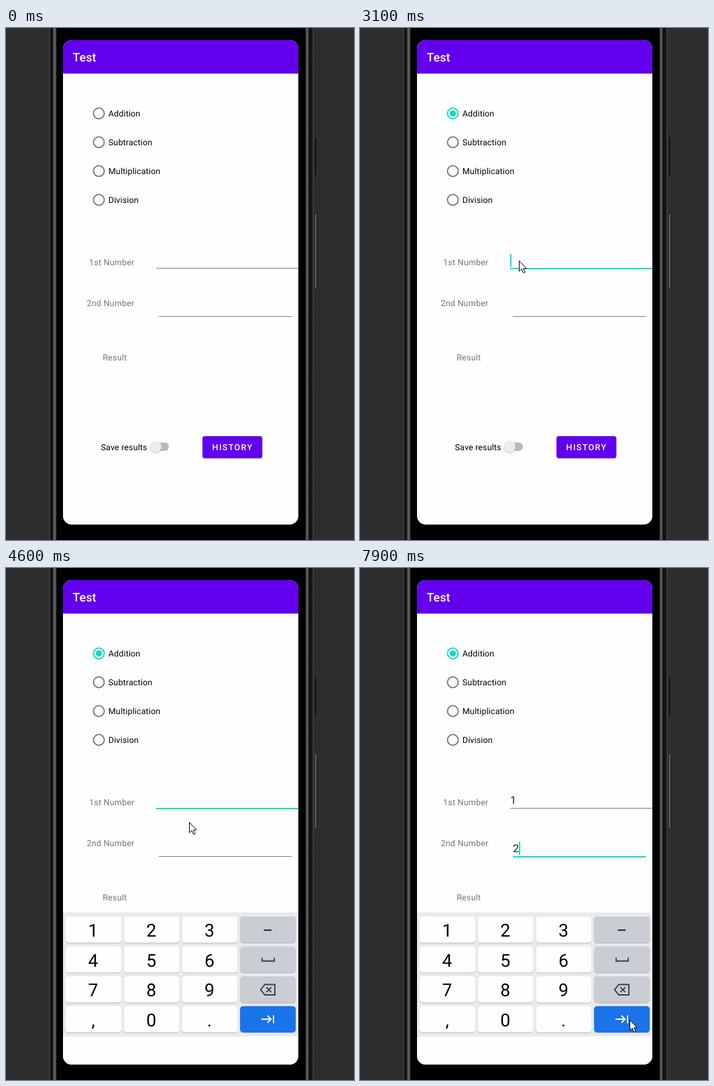
Write an HTML page that moves like this. It is 519 by 764 pixels and loops after 8 s.

```html
<!DOCTYPE html>
<html lang="en">
<head>
<meta charset="utf-8">
<title>Calculator demo</title>
<style>
html, body { margin: 0; width: 100%; height: 100%; overflow: hidden; background: #2d2d2f; }
svg { display: block; }
text { font-family: Roboto, sans-serif; font-size: 12.5px; text-rendering: geometricPrecision; }
.label { fill: #757575; letter-spacing: .22px; }
.option { fill: #000; letter-spacing: .14px; }
.value { font-size: 16.07px; fill: #212121; }
.key { font-size: 26.5px; fill: #000; text-anchor: middle; }
.icon { fill: none; stroke: #3c4043; stroke-width: 1.9; }
</style>
</head>
<body>
<svg width="519" height="764" viewBox="0 0 519 764">
  <defs>
    <clipPath id="screen"><rect x="85" y="18" width="351" height="723" rx="13"/></clipPath>
    <linearGradient id="leftEdge">
      <stop offset="0" stop-color="#1c1c1d"/><stop offset=".1" stop-color="#49494a"/>
      <stop offset=".22" stop-color="#1a1a1b"/><stop offset=".5" stop-color="#101011"/>
      <stop offset=".6" stop-color="#4b4b4d"/><stop offset=".78" stop-color="#6a6a6c"/>
      <stop offset="1" stop-color="#000"/>
    </linearGradient>
    <linearGradient id="rightEdge">
      <stop offset="0" stop-color="#000"/><stop offset=".2" stop-color="#6a6a6c"/>
      <stop offset=".36" stop-color="#3a3a3b"/><stop offset=".46" stop-color="#0c0c0d"/>
      <stop offset=".75" stop-color="#1a1a1b"/><stop offset=".9" stop-color="#454546"/>
      <stop offset="1" stop-color="#1c1c1d"/>
    </linearGradient>
  </defs>

  <rect width="519" height="764" fill="#2d2d2f"/>
  <rect x="76" width="370" height="764"/>
  <rect x="63" width="13" height="764" fill="url(#leftEdge)"/>
  <rect x="446" width="14" height="764" fill="url(#rightEdge)"/>
  <rect x="460" y="163" width="3.5" height="57" rx="1" fill="#161617" stroke="#3b3b3c" stroke-width=".6"/>
  <rect x="460" y="277" width="3.5" height="112" rx="1" fill="#58585a" stroke="#1a1a1b" stroke-width=".8"/>

  <g clip-path="url(#screen)">
    <rect x="85" y="18" width="351" height="723" fill="#fefefe"/>
    <rect x="85" y="18" width="351" height="50" fill="#6200ee"/>
    <text x="99.5" y="50.2" fill="#fff" style="font-size:17.9px;font-weight:500">Test</text>

    <circle id="ripple" cx="138.5" cy="127.5" r="17"/>
    <g id="options"></g>
    <circle id="dot" cx="138.5" cy="127.5" fill="#03dac5"/>

    <text class="label" x="124" y="354.2">1st Number</text>
    <text class="label" x="120.5" y="415.2">2nd Number</text>
    <text class="label" x="144.2" y="496">Result</text>
    <rect id="line1" x="224" y="358" width="212"/>
    <rect id="line2" x="228" y="430" width="198.5"/>
    <text id="value1" class="value" x="224" y="351.5">1</text>
    <text id="value2" class="value" x="228" y="424">2</text>
    <rect id="caret" width="1.8" height="19.5" fill="#03dac5"/>

    <text class="option" x="141.5" y="629.7">Save results</text>
    <rect x="217" y="618.5" width="26" height="12.5" rx="6.25" fill="#b9b9b9"/>
    <circle cx="223" cy="625.8" r="9.2" fill="#000" opacity=".2"/>
    <circle cx="223" cy="625" r="8.9" fill="#ececec"/>
    <rect x="293" y="610.5" width="89.3" height="32.5" rx="3.6" fill="#000" opacity=".25"/>
    <rect x="293" y="609" width="89.3" height="32.8" rx="3.6" fill="#6200ee"/>
    <text x="307.6" y="630" fill="#fff" style="font-weight:500;letter-spacing:1.4px">HISTORY</text>

    <g id="keyboard">
      <rect x="85" y="514" width="351" height="185" fill="#e8eaed"/>
      <rect x="85" y="699" width="351" height="42" fill="#fefefe"/>
      <g id="keys"></g>
      <rect x="384.5" y="539.4" width="11.5" height="2" fill="#202124"/>
      <path class="icon" d="M382 581.5v5h18v-5"/>
      <path class="icon" d="M386 621.5h15v15.5h-15l-6.2-7.75zM388.3 625.6l7.3 7.3m0-7.3l-7.3 7.3"/>
      <path class="icon" style="stroke:#fff" d="M381 673.3h14m-5.2-5.4l5.4 5.4-5.4 5.4M399 667.4v11.8"/>
    </g>
  </g>
  <path id="cursor" d="M.5.5V16l3.6-3.3 2.6 5.8 2.5-1.1-2.6-5.5h4.6z" fill="#fff" stroke="#000"/>
</svg>
<script>
const LOOP = 8000, STEP = 100, TEAL = '#03dac5', GREY = '#757575';
const $ = id => document.getElementById(id);
const set = (id, attrs) => {
  for (const name in attrs) $(id).setAttribute(name, attrs[name]);
};
const show = (id, on) => set(id, { visibility: on ? 'visible' : 'hidden' });

$('options').innerHTML = ['Addition', 'Subtraction', 'Multiplication', 'Division'].map((name, i) =>
  `<circle id="ring${i}" cx="138.5" cy="${127.5 + 43 * i}" r="8.05" fill="none" stroke="${GREY}" stroke-width="1.8"/>
   <text class="option" x="152.8" y="${132.3 + 43 * i}">${name}</text>`).join('');

$('keys').innerHTML = [...'123 456 789 ,0. '].map((char, i) => {
  const col = i % 4, row = i >> 2;
  const x = 89 + 86.7 * col, y = 520 + 44.6 * row;
  const fill = col < 3 ? '#fefefe' : row < 3 ? '#cacdd3' : '#1a73e8';
  const box = (top, color) =>
    `<rect x="${x}" y="${top}" width="83" height="39.2" rx="4.5" fill="${color}"/>`;
  return box(y + 1, '#b4b6ba') + box(y, fill) +
    `<text class="key" x="${x + 41}" y="${y + 30}">${char}</text>`;
}).join('');

// Pointer moves: start, end, target x, target y
const moves = [
  [0, 500, 89, 52], [500, 1200, 139, 124],
  [2100, 2400, 181, 236], [2400, 3000, 237, 347],
  [3800, 4100, 273, 379], [4900, 5600, 395, 649],
  [5700, 5800, 395, 674], [6000, 6400, 245, 417],
  [6400, 6600, 223, 377], [6600, 6800, 269, 418],
  [6900, 7100, 305, 454], [7300, 7500, 405, 703],
  [7600, 7900, 402, 674]
];

// Caret: on, off, x, y
const carets = [
  [3100, 3600, 224, 337], [4100, 4600, 224, 337],
  [4900, 5400, 233, 337], [5900, 6000, 233, 337],
  [6000, 6500, 228.2, 408.5], [7000, 7400, 237.2, 408.5],
  [7900, 8000, 237.2, 408.5]
];

// Keyboard entrance: time, offset, opacity
const slide = [[3500, 96, .5], [3600, 24, .9], [3700, 0, 1]];

function pointer(t) {
  let x = 89, y = 52;
  for (const [from, to, tx, ty] of moves) {
    if (t <= from) break;
    const p = Math.min(1, (t - from) / (to - from));
    x += (tx - x) * p;
    y += (ty - y) * p;
  }
  return `translate(${Math.round(x)} ${Math.round(y)})`;
}

function underline(id, focused) {
  set(id, { height: focused ? 1.9 : 1, fill: focused ? TEAL : '#808080' });
}

function draw(t) {
  const checked = t >= 1700;
  set('ring0', { stroke: checked ? TEAL : GREY });
  set('dot', { r: t < 1700 ? 0 : t < 1800 ? 3 : 4.5 });
  show('ripple', t >= 1600 && t < 2000);
  set('ripple', { fill: checked ? TEAL : '#000', 'fill-opacity': checked ? .2 : .12 });

  underline('line1', t >= 3100 && t < 6000);
  underline('line2', t >= 6000);
  show('value1', t >= 4900);
  show('value2', t >= 7000);

  const caret = carets.find(([on, off]) => t >= on && t < off);
  show('caret', caret);
  if (caret) set('caret', { x: caret[2], y: caret[3] });

  const pose = slide.filter(s => t >= s[0]).pop();
  show('keyboard', pose);
  if (pose) set('keyboard', { transform: `translate(0 ${pose[1]})`, opacity: pose[2] });

  show('cursor', t >= 500);
  set('cursor', { transform: pointer(t) });
}

function tick() {
  const t = performance.now() % LOOP;
  draw(Math.floor(t / STEP) * STEP);
  requestAnimationFrame(tick);
}
tick();
</script>
</body>
</html>
```
